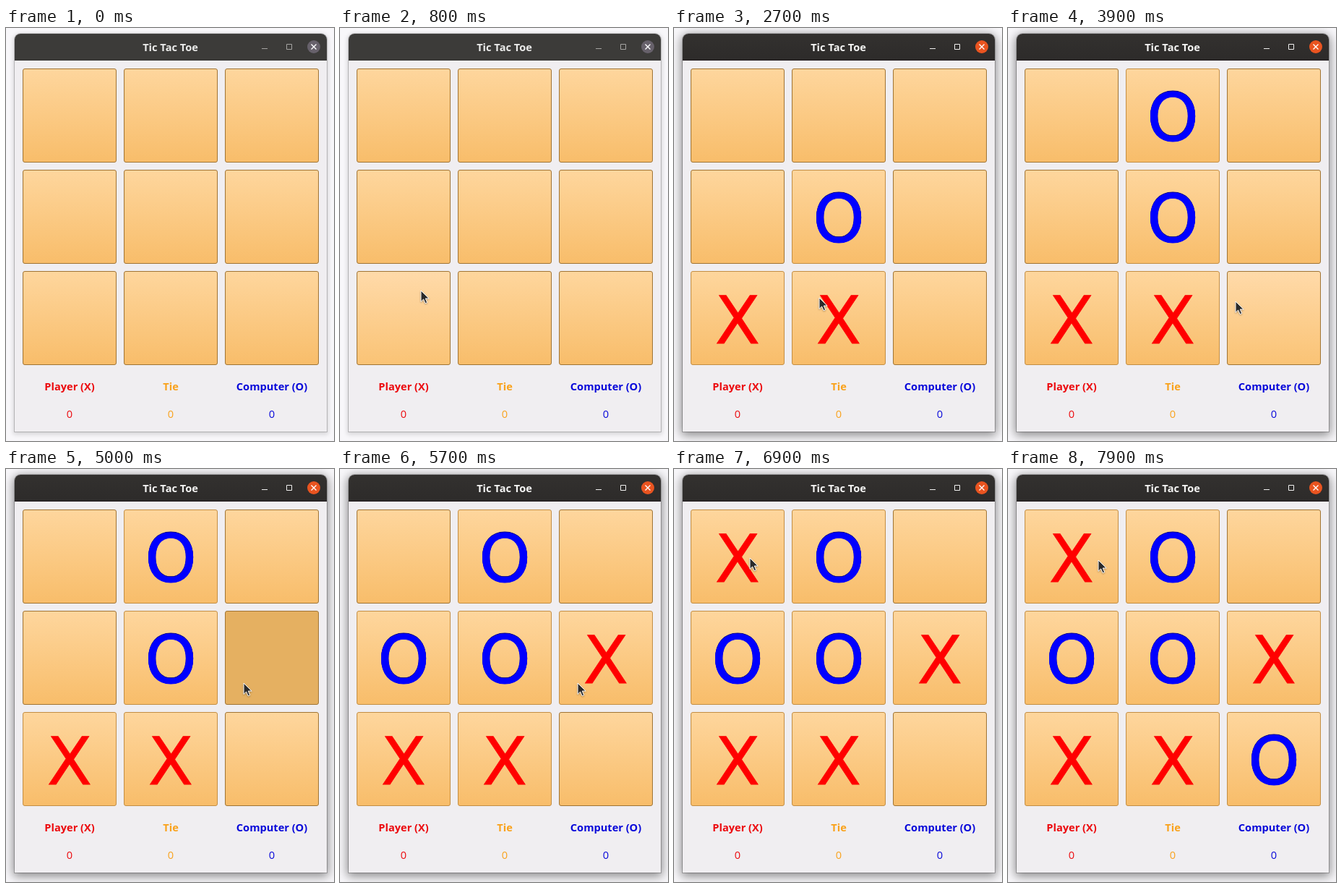
These frames come from a looping animation (454x571 px, 8000 ms). An HTML page:

```html
<!DOCTYPE html>
<html lang="en">
<head>
<meta charset="utf-8">
<title>Tic Tac Toe</title>
<style>
  html, body { margin: 0; width: 100%; height: 100%; overflow: hidden; background: #f8f7fa; }
  #stage { position: absolute; left: 0; top: 0; width: 454px; height: 571px; overflow: hidden; }
  #win {
    position: absolute; left: 12px; top: 8px; width: 432px; height: 550px;
    border-radius: 8px 8px 0 0; overflow: hidden; background: #f0eef1;
    box-shadow: 0 2px 6px 2px rgba(0,0,0,.14), 0 0 0 1px rgba(0,0,0,.2);
  }
  #bar { height: 36px; background: #3c3b39; border-bottom: 1px solid #353432; }
  .focus #win { box-shadow: 0 3px 14px 2px rgba(0,0,0,.45), 0 0 0 1px rgba(0,0,0,.23); }
  .focus #bar { background: linear-gradient(#33312f, #2d2b2a); border-color: #1f181b; }
  svg { position: absolute; left: 0; top: 0; }
  text { font-family: "Open Sans", "Noto Sans", sans-serif; font-size: 14.6px; text-anchor: middle; }
  .bold { font-weight: 700; }
  .mark { font-family: "DejaVu Sans", sans-serif; font-size: 91px; stroke-width: .8; }
  #title { fill: #ebebea; }
  #ctl { fill: none; stroke: #a5a4a2; }
  #close { fill: #67616b; }
  .focus #title { fill: #f4f4f3; }
  .focus #ctl { stroke: #f0f0ef; }
  .focus #close { fill: #e95420; }
</style>
</head>
<body>
<div id="stage">
  <div id="win"><div id="bar"></div></div>
  <svg width="454" height="571" viewBox="0 0 454 571">
    <defs>
      <linearGradient id="idle" x2="0" y2="1">
        <stop stop-color="#fed69d"/><stop offset="1" stop-color="#f8bd6a"/>
      </linearGradient>
      <linearGradient id="hover" x2="0" y2="1">
        <stop stop-color="#ffdaa9"/><stop offset="1" stop-color="#fac375"/>
      </linearGradient>
    </defs>
    <text id="title" class="bold" x="227.5" y="32">Tic Tac Toe</text>
    <path id="ctl" d="M354 28.5h8M388.5 22.5h7v7h-7z"/>
    <circle id="close" cx="426" cy="26" r="9"/>
    <path d="M422.5 22.5l7 7m0-7l-7 7" stroke="#fff" stroke-width="1.4"/>
    <g id="board"></g>
    <g id="scores"></g>
    <path id="cursor" d="M0 0V15.4L3.6 12L6.1 17.7L8.7 16.6L6.3 11H11.2Z"
      fill="#2b2a2a" stroke="#fff" stroke-linejoin="round"
      style="filter:drop-shadow(0 1px 1px rgba(0,0,0,.3))"/>
  </svg>
</div>
<script>
const LOOP = 8000, STEP = 100, FOCUS = 1000, REPLY = 500;
const SIZE = 130, PITCH = 140, LEFT = 23, TOP = 56;

// The computer answers each player move after REPLY ms.
const turns = [
  { press: 1000, release: 1100, player: 6, computer: 4 },
  { press: 2500, release: 2700, player: 7, computer: 1 },
  { press: 5000, release: 5200, player: 5, computer: 3 },
  { press: 6800, release: 6900, player: 0, computer: 8 }
];

// Pointer rests: it leaves at `from` and reaches x, y at `to`.
const rests = [
  { to: 400, x: 152, y: 230 },
  { from: 400, to: 800, x: 112, y: 363 },
  { from: 2100, to: 2400, x: 201, y: 373 },
  { from: 3600, to: 3900, x: 315, y: 378 },
  { from: 4600, to: 4900, x: 329, y: 296 },
  { from: 6300, to: 6400, x: 304, y: 279 },
  { from: 6400, to: 6600, x: 105, y: 123 },
  { from: 7800, to: 7900, x: 125, y: 126 }
];

const $ = id => document.getElementById(id);
const ease = p => p * p * (3 - 2 * p);

function add(parent, tag, attrs, text = '') {
  const el = document.createElementNS('http://www.w3.org/2000/svg', tag);
  for (const k in attrs) el.setAttribute(k, attrs[k]);
  el.textContent = text;
  return parent.appendChild(el);
}

const cells = Array.from({ length: 9 }, (_, i) => {
  const x = LEFT + i % 3 * PITCH, y = TOP + Math.floor(i / 3) * PITCH;
  const box = add($('board'), 'rect', { x: x + .5, y: y + .5, width: SIZE - 1, height: SIZE - 1, rx: 2.5 });
  const glyph = dy => add($('board'), 'text', { class: 'mark', x: x + SIZE / 2, y: y + 100.2 + dy });
  return { x, y, box, shade: glyph(-.8), mark: glyph(0) };
});

[['Player (X)', '#ec0a0e'], ['Tie', '#f9a21c'], ['Computer (O)', '#0a0ada']].forEach(([name, fill], i) => {
  const x = LEFT + SIZE / 2 + i * PITCH;
  add($('scores'), 'text', { class: 'bold', x, y: 501, fill }, name);
  add($('scores'), 'text', { x, y: 539, fill }, '0');
});

function pointerAt(t) {
  const next = rests.findLastIndex((r, i) => i && t > r.from);
  if (next < 0) return { x: -99, y: -99 };
  const a = rests[next - 1], b = rests[next];
  const p = ease(Math.min(1, (t - b.from) / (b.to - b.from)));
  return { x: Math.round(a.x + (b.x - a.x) * p), y: Math.round(a.y + (b.y - a.y) * p) };
}

function signAt(i, t) {
  if (turns.some(m => m.player === i && t >= m.release)) return 'X';
  if (turns.some(m => m.computer === i && t >= m.release + REPLY)) return 'O';
  return '';
}

function setSign(el, sign, color) {
  el.textContent = sign;
  el.setAttribute('fill', color);
  el.setAttribute('stroke', color);
}

function draw(time) {
  const t = Math.floor(time / STEP) * STEP;
  $('stage').classList.toggle('focus', t >= FOCUS);
  const tip = pointerAt(t);
  $('cursor').setAttribute('transform', `translate(${tip.x} ${tip.y})`);
  const down = turns.some(m => t >= m.press && t < m.release);

  cells.forEach(({ x, y, box, shade, mark }, i) => {
    const sign = signAt(i, t);
    const over = !sign && tip.x >= x && tip.x < x + SIZE && tip.y >= y && tip.y < y + SIZE;
    box.setAttribute('fill', over ? (down ? '#e5b061' : 'url(#hover)') : 'url(#idle)');
    box.setAttribute('stroke', sign ? '#c38e44' : '#a07434');
    setSign(mark, sign, sign === 'X' ? '#f00' : '#00f');
    setSign(shade, sign === 'O' ? sign : '', '#00008c');
  });
}

function tick() {
  draw(performance.now() % LOOP);
  requestAnimationFrame(tick);
}
tick();
</script>
</body>
</html>
```
